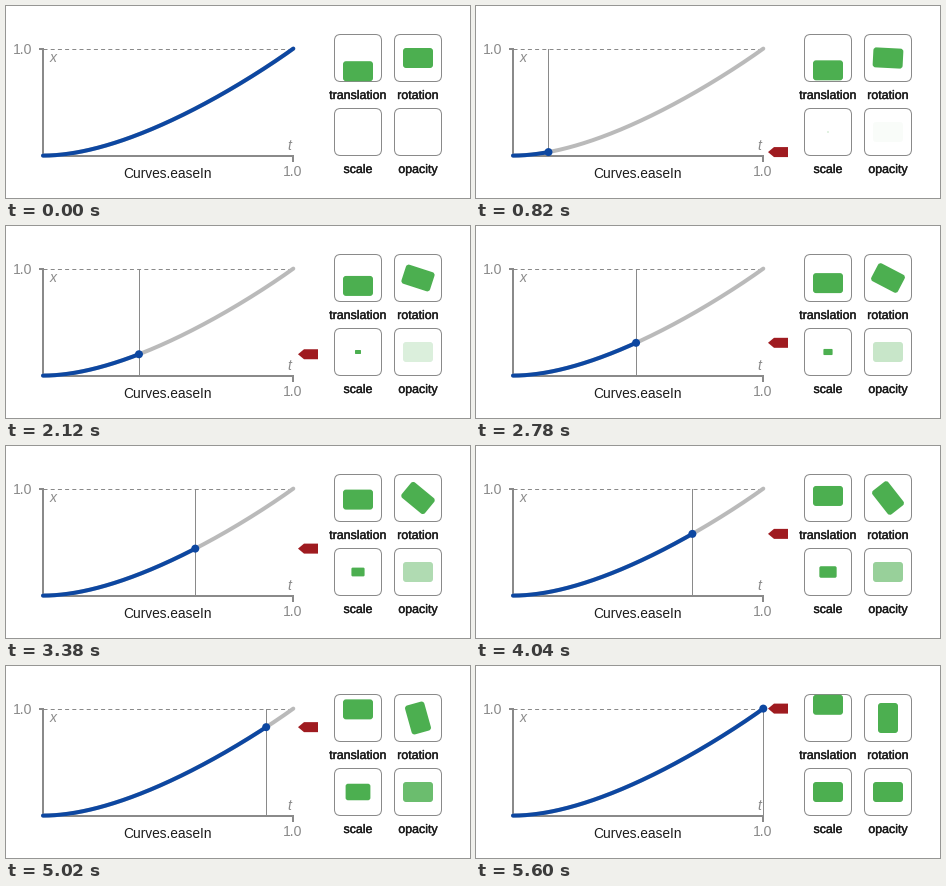
Recreate the animation shown at these times as a matplotlib script. Size 464 by 192 pixels, loop 5.62 s.

```python
import numpy as np
import matplotlib.pyplot as plt
from matplotlib.animation import FuncAnimation
from matplotlib.patches import Circle, FancyBboxPatch, Polygon
from matplotlib.patheffects import withStroke
from matplotlib.transforms import Affine2D

W, H, DPI = 464, 192, 64
PX = 72 / DPI
X0, X1, Y0, Y1 = 37, 287.3, 149.6, 42.6
STEPS, TICK = 120, 20

GREEN, BLUE, RED = "#4caf50", "#0d47a1", "#9f1b20"
GRAY, PALE, INK = "#8a8a8a", "#bababa", "#1c1c1c"

plt.rcParams["font.family"] = "Liberation Sans"
fig = plt.figure(figsize=(W / DPI, H / DPI), dpi=DPI, facecolor="white")
ax = fig.add_axes([0, 0, 1, 1])
ax.set(xlim=(0, W), ylim=(H, 0))
ax.axis("off")


def ease_in(s):
    """Cubic Bezier (0.42, 0, 1, 1) at parameter s."""
    r = 1 - s
    y = 3 * r * s**2 + s**3
    return 3 * r**2 * s * 0.42 + y, y


S = np.linspace(0, 1, 801)
T, V = ease_in(S)


def to_px(t, v):
    return X0 + (X1 - X0) * t, Y0 + (Y1 - Y0) * v


def line(xs, ys, color, width, z, **kw):
    return ax.plot(xs, ys, color=color, lw=width * PX, zorder=z, **kw)[0]


def label(x, y, text, size, color, **kw):
    kw = {"ha": "center", "va": "baseline", **kw}
    return ax.text(x, y, text, fontsize=size * PX, color=color, zorder=8, **kw)


def rounded(w, h, radius, **kw):
    return ax.add_patch(FancyBboxPatch(
        (-w / 2, -h / 2), w, h,
        boxstyle=f"round,pad=0,rounding_size={radius}", **kw))


def place(patch, x, y, scale=1, turn=0):
    move = Affine2D().scale(max(scale, 1e-3)).rotate_deg(turn).translate(x, y)
    patch.set_transform(move + ax.transData)


# Graph
line([X0, X1], [Y1, Y1], GRAY, 1, 1, dashes=(4, 3.2), dash_capstyle="butt")
line([34, X0, X0], [Y1, Y1, Y0], GRAY, 2, 2, solid_joinstyle="miter")
line([X0, X1, X1], [Y0 + .4, Y0 + .4, 154.5], GRAY, 2, 2,
     solid_joinstyle="miter")
line(*to_px(T, V), PALE, 4, 3, solid_capstyle="round")
trace = line([], [], BLUE, 4, 5, solid_capstyle="round")
guide = line([], [], GRAY, 1, 4)
dot = ax.add_patch(Circle((0, 0), 4, fc=BLUE, lw=0, zorder=6))
pointer = ax.add_patch(Polygon([(0, 0)], fc=RED, lw=0, zorder=6))
TIP = np.array([(292, 0), (298, -5), (312, -5), (312, 5), (298, 5)])

label(17, 48, "1.0", 14, GRAY)
label(287, 170, "1.0", 14, GRAY)
label(43.5, 56, "x", 14, GRAY, style="italic", ha="left")
label(281.5, 144, "t", 14, GRAY, style="italic", ha="left")
label(162, 172, "Curves.easeIn", 13.8, INK)

# Sample tiles
tiles = {}
for name, x, y in [("translation", 352, 52), ("rotation", 412, 52),
                   ("scale", 352, 126), ("opacity", 412, 126)]:
    frame = rounded(47, 47, 6, fc="none", ec=GRAY, lw=PX, zorder=2)
    place(frame, x, y)
    text = label(x, y + 41, name, 12.4, INK)
    text.set_path_effects([withStroke(linewidth=0.4 * PX, foreground=INK)])
    tiles[name] = rounded(30, 20, 3, fc=GREEN, lw=0, zorder=3)


def step_at(tick):
    # Steps last 1, 5 and 1 ticks in turn.
    group, rest = divmod(tick, 7)
    return 3 * group + (rest > 0) + (rest > 5)


def draw(tick):
    t = step_at(tick) / STEPS
    s = np.interp(t, T, S)
    v = ease_in(s)[1]
    moving = t > 0
    x, y = to_px(t, v)

    trace.set_data(*to_px(*ease_in(np.linspace(0, s if moving else 1, 200))))
    guide.set_data([x, x], [Y1, Y0])
    dot.center = x, y
    pointer.set_xy(TIP + (0, y))
    for part in (guide, dot, pointer):
        part.set_visible(moving)

    place(tiles["translation"], 352, 65.2 - 26.4 * v)
    place(tiles["rotation"], 412, 52, turn=90 * v)
    place(tiles["scale"], 352, 126, scale=v)
    tiles["scale"].set_visible(moving)
    place(tiles["opacity"], 412, 126)
    tiles["opacity"].set_alpha(v)
    return trace, guide, dot, pointer, *tiles.values()


anim = FuncAnimation(fig, draw, frames=281, interval=TICK, repeat=True,
                     repeat_delay=0, blit=False)
plt.show()
```
